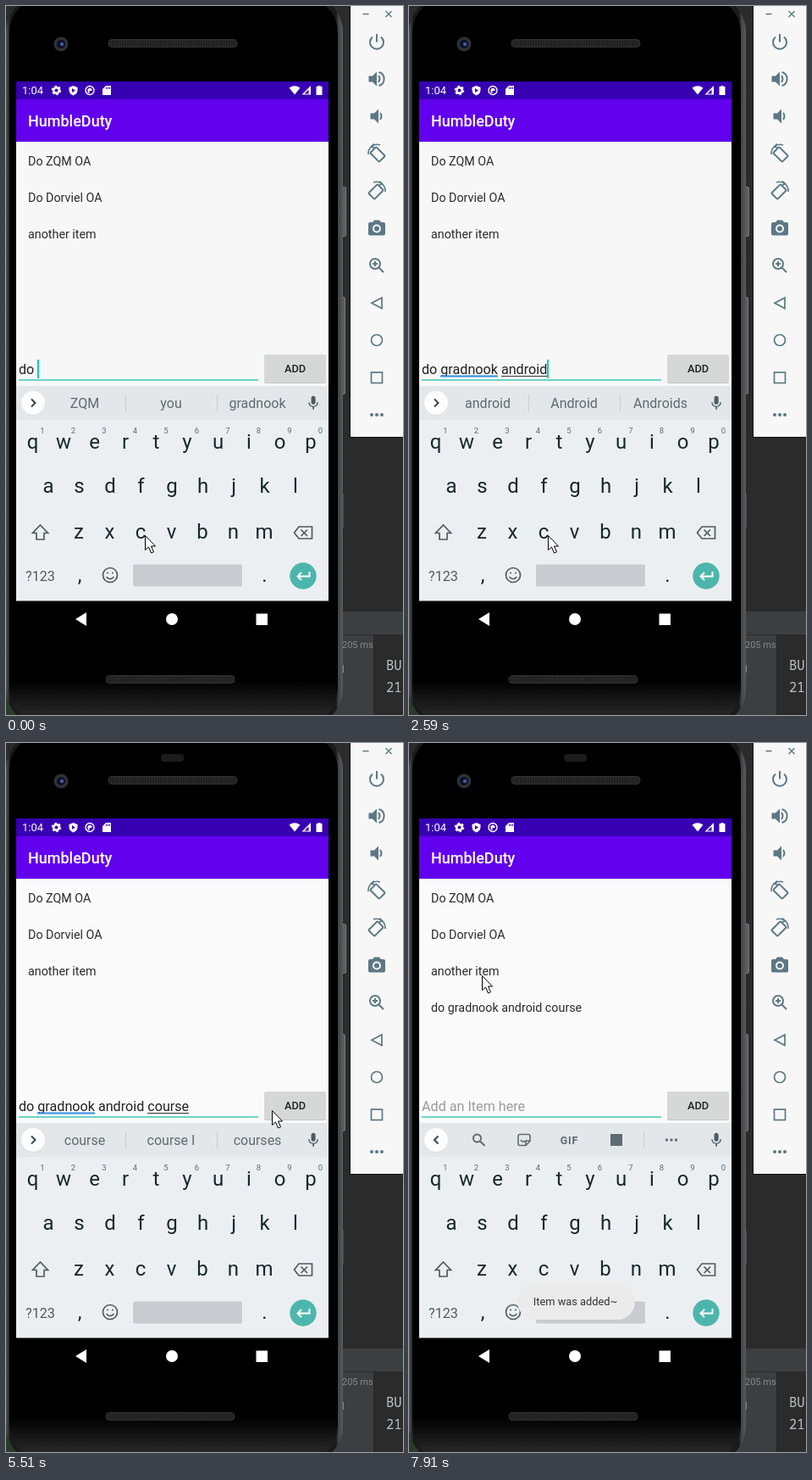
These frames come from a looping animation (469 px wide and 836 px high, 8000 ms). An HTML page:

```html
<!DOCTYPE html>
<html lang="en">
<head>
<meta charset="utf-8">
<title>Todo app</title>
<style>
  html, body { margin: 0; width: 100%; height: 100%; overflow: hidden; background: #2b2b2b; }
  svg { display: block; width: 469px; height: 836px; font-family: Roboto, sans-serif; }
  text { white-space: pre; }
  .mid { text-anchor: middle; }
  .line { fill: none; stroke-width: 2; }
  .list { font-size: 14.3px; fill: #2b2b2b; }
  .hint { font-size: 16px; fill: #5f6b72; }
  .mono { font: 15.5px "Noto Sans Mono", "DejaVu Sans Mono", monospace; fill: #bcc0c4; }
</style>
</head>
<body>
<svg viewBox="0 0 469 836">
  <defs>
    <linearGradient id="rim">
      <stop offset="0" stop-color="#565657"/><stop offset=".012" stop-color="#1a1a1b"/>
      <stop offset=".98" stop-color="#1a1a1b"/><stop offset=".986" stop-color="#414244"/>
      <stop offset="1" stop-color="#5a5b5d"/>
    </linearGradient>
    <linearGradient id="glass" x2="0" y2="1">
      <stop offset=".94" stop-color="#000"/><stop offset=".985" stop-color="#242424"/>
    </linearGradient>
    <pattern id="mesh" width="3" height="3" patternUnits="userSpaceOnUse">
      <rect width="3" height="3" fill="#1c1c1c"/><circle cx="1.5" cy="1.5" r="1" fill="#323232"/>
    </pattern>
    <path id="mic" d="M12 14a3 3 0 0 0 3-3V5a3 3 0 0 0-6 0v6a3 3 0 0 0 3 3zm5.3-3a5.3 5.3 0 0 1-10.6 0H5a7 7 0 0 0 6 6.7V21h2v-3.3a7 7 0 0 0 6-6.7z"/>
    <g id="rotate">
      <rect x="-5" y="-7.500" width="10" height="15" rx="1" transform="translate(1 1) rotate(-45)"/>
      <path d="M-10 1A10.500 10.500 0 0 1 4-10M-3-11.500l-3.500 3 4 2" stroke-width="1.600"/>
    </g>
  </defs>

  <!-- desktop behind the phone -->
  <rect width="469" height="836" fill="#2b2b2b"/>
  <rect y="790" width="60" height="46" fill="#2c3a2b"/>
  <rect x="390" y="714" width="79" height="27" fill="#3c3f41"/>
  <rect x="350" y="742" width="84" height="94" fill="#3c3f41"/>
  <rect x="434" y="742" width="1" height="94" fill="#252627"/>
  <text x="449" y="783" class="mono">BUI</text>
  <text x="449" y="809" class="mono">21</text>

  <!-- phone body -->
  <g fill="#5c5d5f" stroke="#77787a">
    <rect x="396.500" y="213.500" width="5" height="58" rx="1.500"/>
    <rect x="396.500" y="343.500" width="4" height="114" rx="1.500"/>
  </g>
  <path d="M398.500 575v40" stroke="#4b4c4d"/>
  <rect x="0" y="-14" width="398" height="864" rx="45" fill="url(#rim)"/>
  <rect x="4" y="-10" width="388" height="856" rx="41" fill="url(#glass)"/>
  <rect x="121" y="39.500" width="152" height="9" rx="4" fill="url(#mesh)" stroke="#303030"/>
  <rect x="118" y="789.500" width="152" height="9" rx="4" fill="url(#mesh)" stroke="#303030"/>
  <rect id="notch" x="183" y="13" width="27" height="9" rx="4" fill="#1c1c1c"/>
  <circle cx="65" cy="45" r="8.500" fill="#303137"/>
  <circle cx="65" cy="45" r="5" fill="#0d1124"/>
  <circle cx="66" cy="45" r="2.200" fill="#43579c"/>
  <text x="397" y="757" font-size="11" fill="#85888a">205 ms</text>
  <path d="M398.500 777v9" stroke="#85888a"/>

  <!-- app -->
  <rect id="page" x="12" y="89" width="369" height="360"/>
  <rect x="12" y="89" width="369" height="21" fill="#3700b3"/>
  <rect x="12" y="110" width="369" height="50" fill="#6200ee"/>
  <path d="M12 160.500h369" stroke="#e2e2e2"/>
  <g fill="#fff">
    <text x="19" y="104" font-size="13">1:04</text>
    <circle cx="59.500" cy="99.500" r="3.300" class="line" stroke="#fff" style="stroke-width:2.600"/>
    <circle cx="59.500" cy="99.500" r="5" fill="none" stroke="#fff" stroke-width="1.500" stroke-dasharray="2.600"/>
    <path d="M79.500 94l5 2v3q0 4.500-5 6.500-5-2-5-6.500v-3z"/>
    <path d="M78 97l4 2.500-4 2.500z" fill="#3700b3"/>
    <circle cx="99" cy="99.500" r="5" fill="none" stroke="#fff" stroke-width="1.400"/>
    <path d="M96.500 102v-4l2.500-1.500 2.500 1.500v2h-3v3z"/>
    <path d="M118 94h6v11h-10v-7z"/>
    <path d="M118.500 95.500v2.500m2-2.500v2.500m2-2.500v2.500" stroke="#3700b3"/>
    <path d="M334.500 96.500q6.500-4.500 13 0l-6.500 8z"/>
    <path d="M360 94v10.500h-10.500z"/><path d="M352.500 103.500h5v-5z" fill="#3700b3"/>
    <path d="M368.500 94h3v1h2v10h-7V95h2z"/>
    <text x="26" y="142" font-size="18" font-weight="500">HumbleDuty</text>
  </g>
  <g class="list">
    <text x="26" y="187.500">Do ZQM OA</text>
    <text x="26" y="230.500">Do Dorviel OA</text>
    <text x="26" y="273.500">another item</text>
    <text x="26" y="316.500" id="added">do gradnook android course</text>
  </g>
  <text id="field" x="15" y="434" font-size="16.150"></text>
  <path d="M15 441h283" stroke="#3cc8b4" stroke-width="1.300"/>
  <path id="spell" stroke="#2f8fe0" stroke-width="2"/>
  <path id="compose" stroke="#333"/>
  <rect id="caret" y="417" width="2" height="22" fill="#03cdbb"/>
  <rect x="305" y="412" width="73" height="33" rx="2" fill="#c5c6c6"/>
  <rect id="button" x="305" y="411" width="73" height="33" rx="2"/>
  <text x="341.500" y="431.500" class="mid" font-size="12.800" font-weight="500" fill="#222">ADD</text>

  <!-- keyboard -->
  <rect x="12" y="448" width="369" height="41" fill="#e3e7e9"/>
  <rect x="12" y="488" width="369" height="213.500" fill="#eceff1"/>
  <circle cx="32" cy="468.500" r="14" fill="#cdd2d4"/>
  <circle cx="32" cy="468" r="14" fill="#fdfdfd"/>
  <path id="chevron" class="line" stroke="#37474f"/>
  <use href="#mic" fill="#4f5b62" transform="translate(353 458) scale(.84)"/>
  <g id="words" class="hint mid">
    <path d="M141.500 458v21M249.500 458v21" stroke="#c9ced1"/>
    <text x="93" y="474"></text><text x="195" y="474"></text><text x="297" y="474"></text>
  </g>
  <g id="tools" stroke="#5f6b72" class="line">
    <circle cx="80.500" cy="466" r="4.500"/><path d="M84 469.500l5.500 5.500"/>
    <path d="M131 461.500h10q2 0 2 2v6l-5 5h-7q-2 0-2-2v-9q0-2 2-2zM143 469h-5v5M132 468q3 4 5 1" stroke-width="1.600"/>
    <text x="189.500" y="472.500" class="mid" font-size="12.500" font-weight="700" letter-spacing=".8" fill="#5f6b72" stroke="none">GIF</text>
    <rect x="238" y="461" width="14" height="14" fill="#5f6b72" stroke="none"/>
    <path d="M277.500 458v20" stroke="#c9ced1" stroke-width="1"/>
    <path d="M304.500 468h0m5.500 0h0m5.500 0h0" stroke-width="3.400" stroke-linecap="round"/>
  </g>
  <g id="keys" class="mid" fill="#16282f" font-size="24"></g>
  <g class="line" stroke="#4f5b62" style="stroke-width:1.700">
    <path d="M40.500 612l9 9.500h-4.500v7.500h-9v-7.500h-4.500z"/>
    <path d="M346 614h15.500v14H346l-5.500-7zM348.500 617.500l7.500 7.500m0-7.500l-7.500 7.500"/>
    <circle cx="123" cy="671" r="8.500"/>
    <path d="M118.500 673q4.500 5 9 0M119 668.500h2m4 0h2"/>
  </g>
  <rect x="150" y="658.500" width="129" height="26" rx="2" fill="#c8ccd0"/>
  <text x="40.500" y="677.500" class="mid" font-size="16.200" fill="#4f5b62">?123</text>
  <circle cx="351" cy="672" r="15.700" fill="#4db6ac"/>
  <path d="M358.500 667v5.500h-14m4.500-4.500l-4.500 4.500 4.500 4.500" class="line" stroke="#fff"/>
  <g id="toast">
    <rect x="128" y="637" width="139" height="43" rx="21" fill="#ebebeb"/>
    <text x="196.500" y="663" class="mid" font-size="12.800" fill="#333">Item was added~</text>
  </g>
  <path d="M95 715v16l-13-8z" fill="#fff"/>
  <circle cx="196" cy="723" r="7" fill="#fff"/>
  <rect x="295.500" y="716.500" width="13.500" height="13.500" fill="#fff"/>

  <!-- emulator toolbar -->
  <rect x="406" width="63" height="509" fill="#101010"/>
  <rect x="407" width="62" height="508" fill="#f7f7f7"/>
  <g class="line" stroke="#5c7885">
    <path d="M421.500 9.500h7M448.500 6l7 7m0-7l-7 7" stroke-width="1.400"/>
    <path d="M438 33v9.500M433 36.500a8 8 0 1 0 10 0"/>
    <path d="M428.500 82.500h4.500l5-5v17l-5-5h-4.500z" fill="#5c7885" stroke="none"/>
    <path d="M440 82q3 4 0 8M440.500 78a8.300 8.300 0 0 1 0 16"/>
    <path d="M430.500 126.500h4.500l5-5v17l-5-5h-4.500z" fill="#5c7885" stroke="none"/>
    <path d="M442 126q3 4 0 8"/>
    <use href="#rotate" x="438" y="174"/>
    <use href="#rotate" transform="translate(438 218) scale(-1 1)"/>
    <path d="M435 252.500h6l2 2.500h3q2 0 2 2v11.500q0 2-2 2h-16q-2 0-2-2V257q0-2 2-2h3z" fill="#5c7885" stroke="none"/>
    <circle cx="438" cy="262.500" r="4" stroke="#f7f7f7"/>
    <circle cx="436" cy="304" r="6"/><path d="M440.500 308.500l5.500 5.500M433 304h6m-3-3v6"/>
    <path d="M444 344v12.500l-12-6.250z" stroke-width="1.700"/>
    <circle cx="438" cy="394" r="6.500" stroke-width="1.700"/>
    <rect x="431.500" y="432" width="13" height="12.500" stroke-width="1.700"/>
    <path d="M432 482h0m6 0h0m6 0h0" stroke-width="4" stroke-linecap="round"/>
  </g>
  <path id="mouse" d="M.5.500v17l4-3.500 3 7 3-1.300-3-6.700h5z" fill="#fff" stroke="#000"/>
</svg>
<script>
const LOOP = 8000;
const ENTRY = 'do gradnook android course';
const $ = id => document.getElementById(id);

// time, characters typed, suggestions (* marks the bold one)
const typing = [
  [0, 3, 'ZQM|you|gradnook'],
  [280, 4, 'g|good|get'],
  [400, 5, 'gr|great|group'],
  [520, 6, 'gra|grab|grade'],
  [640, 7, 'grad|grade|grads'],
  [760, 8, 'gradn|*grade|grading'],
  [880, 9, 'gradno|*grads|gradnook'],
  [1000, 10, 'gradnoo|*gradnook|grading'],
  [1280, 11, 'gradnook|Gradnook|gradnooks'],
  [1400, 12, 'I|android|to'],
  [1520, 13, 'a|and|android'],
  [1670, 14, 'an|and|any'],
  [1790, 15, 'and|android|ands'],
  [1930, 16, 'andr|*android|Android'],
  [2190, 17, 'andro|*android|Android'],
  [2330, 18, 'androi|*android|Android'],
  [2590, 19, 'android|Android|Androids'],
  [2880, 20, 'app|and|phone'],
  [3140, 21, 'c|can|could'],
  [3260, 22, 'co|could|come'],
  [3380, 23, 'cou|could|course'],
  [3520, 24, 'cour|*course|court'],
  [3640, 25, 'cours|*course|courses'],
  [3890, 26, 'course|course I|courses']
];

// time, pointer position
const pointer = [
  [0, 164, 624], [4820, 172, 615], [4940, 220, 556], [5090, 268, 470],
  [5240, 298, 409], [5390, 309, 424], [5510, 314, 433], [5630, 321, 433],
  [5750, 330, 432], [5870, 336, 431], [6770, 325, 418], [6890, 278, 372],
  [7010, 205, 310], [7130, 132, 266], [7250, 91, 250], [7370, 85, 254],
  [7490, 85, 260], [7640, 85, 264], [7760, 85, 268], [7910, 86, 274]
];

const caretHidden = [[4450, 4940], [5390, 6020], [6620, 7130], [7640, LOOP]];

const at = (steps, t) => steps.findLast(step => step[0] <= t);
const show = (id, on) => $(id).style.display = on ? '' : 'none';
const pen = document.createElement('canvas').getContext('2d');
const textEnd = text => {
  pen.font = '16.15px Roboto, sans-serif';
  return Math.round(15 + pen.measureText(text).width);
};
const underline = (id, from, to) =>
  $(id).setAttribute('d', to > from ? `M${textEnd(ENTRY.slice(0, from))} 436.500H${textEnd(ENTRY.slice(0, to))}` : '');

function buildKeys() {
  const key = (char, x, y) => `<text x="${x}" y="${y}">${char}</text>`;
  const row = (chars, x, y) => [...chars].map((char, i) => key(char, x + i * 36.5, y)).join('');
  const digits = [...'1234567890'].map((digit, i) =>
    `<text x="${43 + i * 36.5}" y="504" font-size="9.500" fill="#5f6b72">${digit}</text>`).join('');
  $('keys').innerHTML = row('qwertyuiop', 31.5, 522) + row('asdfghjkl', 50, 574) +
    row('zxcvbnm', 86, 628) + key(',', 87, 679) + key('.', 305.5, 679) + digits;
}

function draw() {
  const t = performance.now() % LOOP;
  const [, count, list] = at(typing, t);
  const cleared = t >= 6140, added = t >= 6380, late = t >= 5090;
  const typed = cleared ? '' : ENTRY.slice(0, count);

  $('field').textContent = cleared ? 'Add an Item here' : typed;
  $('field').setAttribute('fill', cleared ? '#9b9b9b' : '#222');
  underline('spell', 3, typed.length >= 12 ? 11 : 0);
  underline('compose', typed.lastIndexOf(' ') + 1, typed.length);
  $('caret').setAttribute('x', textEnd(typed));
  show('caret', !caretHidden.some(([from, to]) => t >= from && t < to));

  list.split('|').forEach((word, i) => {
    const label = $('words').querySelectorAll('text')[i];
    const bold = word.startsWith('*');
    label.textContent = word.replace('*', '');
    label.setAttribute('font-weight', bold ? 700 : 400);
    label.setAttribute('fill', bold ? '#111' : '#5f6b72');
  });
  show('words', !added);
  show('tools', added);
  $('chevron').setAttribute('d', added ? 'M34.500 463.500l-4.500 4.500 4.500 4.500' : 'M30 463.500l4.500 4.500-4.500 4.500');

  show('added', added);
  show('notch', late);
  $('page').setAttribute('fill', late ? '#fafafa' : '#f7f7f7');
  $('button').setAttribute('fill', t >= 6020 && t < 6500 ? '#b9baba' : '#d6d7d7');
  $('toast').setAttribute('opacity', t < 6500 ? 0 : t < 6620 ? .5 : 1);

  const [, x, y] = at(pointer, t);
  $('mouse').setAttribute('transform', `translate(${x} ${y})`);
  requestAnimationFrame(draw);
}

buildKeys();
draw();
</script>
</body>
</html>
```
